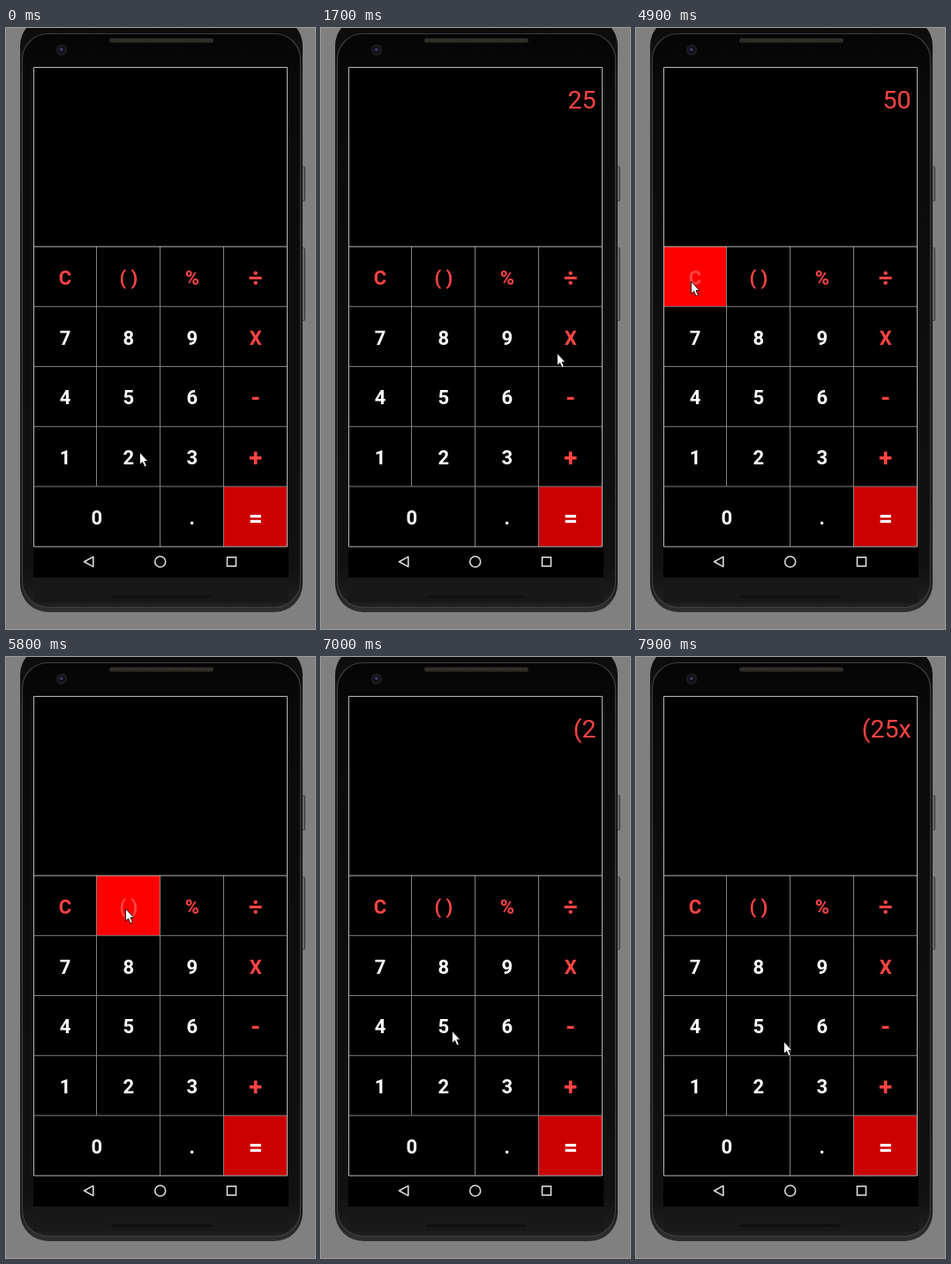
Write an HTML page that moves like this. It is 350 px wide and 679 px high and loops after 8000 ms.

```html
<!DOCTYPE html>
<html lang="en">
<head>
<meta charset="utf-8">
<title>Calculator</title>
<style>
html, body { margin: 0; width: 100%; height: 100%; overflow: hidden; background: #808080; }
#stage { position: relative; width: 350px; height: 679px; overflow: hidden; }
svg { position: absolute; left: 0; top: 0; }
#stage, text { font-family: Roboto, "Liberation Sans", sans-serif; }

#keys text { font-size: 22px; font-weight: 700; fill: #fff; text-anchor: middle; }
#keys .op { fill: #ff4444; }
#keys .big { font-size: 28px; }
#keys rect { fill: transparent; }
#keys .equals { fill: #c00; }

#display { position: absolute; right: 38.4px; top: 62px; width: 270px; height: 40px; overflow: hidden; }
#display p { margin: 0; height: 40px; font-size: 28.5px; line-height: 40px; text-align: right; color: #ff4444; }

#lines, .key2, .key5, .keyC, .keyP, .keyX { animation: 8s step-end infinite; }
#lines { animation-name: entry; }
.key2 { animation-name: press2; }
.key5 { animation-name: press5; }
.keyC { animation-name: pressC; }
.keyP { animation-name: pressP; }
.keyX { animation-name: pressX; }
#cursor { animation: pointer 8s step-end infinite; }

@keyframes entry {
  0% { transform: translateY(0); }
  8.75% { transform: translateY(-40px); }
  16.25% { transform: translateY(-80px); }
  26.25% { transform: translateY(-120px); }
  37.5% { transform: translateY(-160px); }
  46.25% { transform: translateY(-200px); }
  62.5% { transform: translateY(-240px); }
  75% { transform: translateY(-280px); }
  86.25% { transform: translateY(-320px); }
  92.5% { transform: translateY(-360px); }
  97.5%, 100% { transform: translateY(-400px); }
}
@keyframes press2 {
  0%, 6.25%, 85%, 100% { fill: transparent; }
  5%, 83.75% { fill: #f00; }
}
@keyframes press5 {
  0%, 13.75%, 91.25%, 100% { fill: transparent; }
  12.5%, 90% { fill: #f00; }
}
@keyframes pressC {
  0%, 62.5%, 100% { fill: transparent; }
  61.25% { fill: #f00; }
}
@keyframes pressP {
  0%, 73.75%, 100% { fill: transparent; }
  72.5% { fill: #f00; }
}
@keyframes pressX {
  0%, 96.25%, 100% { fill: transparent; }
  95% { fill: #f00; }
}
/* The pointer advances in 100 ms steps */
@keyframes pointer {
  0% { transform: translate(151px, 479px); }
  1.25% { transform: translate(150px, 480px); }
  5% { transform: translate(150px, 473px); }
  8.75% { transform: translate(150px, 436px); }
  11.25% { transform: translate(148px, 425px); }
  15% { transform: translate(148px, 425px); animation-timing-function: steps(5); }
  21.25% { transform: translate(267px, 367px); }
  22.5% { transform: translate(269px, 366px); }
  23.75% { transform: translate(270px, 367px); }
  25% { transform: translate(270px, 367px); animation-timing-function: steps(5); }
  31.25% { transform: translate(149px, 460px); }
  36.25% { transform: translate(149px, 460px); animation-timing-function: steps(5); }
  42.5% { transform: translate(279px, 562px); }
  52.5% { transform: translate(279px, 562px); animation-timing-function: steps(5); }
  58.75% { transform: translate(62px, 286px); }
  61.25% { transform: translate(62px, 286px); animation-timing-function: steps(4); }
  66.25% { transform: translate(135px, 284px); }
  72.5% { transform: translate(135px, 284px); animation-timing-function: steps(4); }
  77.5% { transform: translate(134.5px, 418px); animation-timing-function: steps(4); }
  82.5% { transform: translate(140px, 474px); }
  85% { transform: translate(140px, 474px); animation-timing-function: steps(2); }
  87.5% { transform: translate(148px, 422px); }
  90% { transform: translate(148px, 422px); animation-timing-function: steps(3); }
  93.75% { transform: translate(268px, 360px); }
  96.25% { transform: translate(268px, 360px); animation-timing-function: steps(2); }
  98.75%, 100% { transform: translate(167px, 434px); }
}
</style>
</head>
<body>
<div id="stage">
  <svg width="350" height="679" viewBox="0 0 350 679">
    <defs>
      <linearGradient id="rim" x2="0" y2="1">
        <stop offset="0" stop-color="#080808"/>
        <stop offset=".1" stop-color="#1a1a1a"/>
        <stop offset=".95" stop-color="#1a1a1a"/>
        <stop offset="1" stop-color="#303030"/>
      </linearGradient>
      <linearGradient id="shell" x2="0" y2="1">
        <stop offset="0" stop-color="#050505"/>
        <stop offset=".1" stop-color="#0a0a0a"/>
        <stop offset=".93" stop-color="#111"/>
        <stop offset="1" stop-color="#202020"/>
      </linearGradient>
      <pattern id="mesh" width="3" height="3" patternUnits="userSpaceOnUse">
        <rect width="3" height="3" fill="#292622"/>
        <circle cx="1.5" cy="1.5" r=".9" fill="#403b35"/>
      </pattern>
    </defs>

    <!-- phone body -->
    <g fill="#6a6a6a" stroke="#3c3c3c">
      <rect x="335.5" y="156.5" width="3" height="39" rx="1"/>
      <rect x="335.5" y="248.5" width="3" height="82" rx="1"/>
    </g>
    <rect x="16" y="-12" width="320" height="672" rx="32" fill="url(#rim)"/>
    <rect x="18.5" y="6.5" width="315" height="648" rx="29" fill="url(#shell)" stroke="#3e3e3e" stroke-width="1.2"/>
    <rect x="31" y="621" width="289" height="28" fill="#181818"/>
    <rect x="117" y="11.5" width="118" height="5" rx="2.5" fill="url(#mesh)"/>
    <rect x="118" y="640" width="115" height="5" rx="2.5" fill="#111" stroke="#252525" stroke-dasharray="1 1"/>
    <circle cx="63" cy="24.7" r="6.3" fill="#1a1a1f"/>
    <circle cx="63" cy="24.7" r="3.8" fill="#101019"/>
    <circle cx="62.7" cy="24.3" r="1.8" fill="#3c3c6c"/>

    <!-- screen -->
    <rect x="31" y="44" width="289" height="577"/>
    <g id="keys"></g>
    <path d="M31 314.75H319M31 382.5H319M31 450.25H319M31 518H319
      M102.5 247V518M174.5 247V586M246.5 247V586"
      fill="none" stroke="#808080"/>
    <path d="M31.5 44.5H318.5V586H31.5ZM31 247H319" fill="none" stroke="#b8b8b8"/>

    <!-- navigation -->
    <g fill="none" stroke="#dcdcdc" stroke-width="1.6">
      <path d="M88.5 603L98.8 597.4V608.6Z" stroke-linejoin="round"/>
      <circle cx="174.7" cy="603" r="6"/>
      <rect x="250.5" y="598" width="10" height="10"/>
    </g>
  </svg>

  <div id="display">
    <div id="lines">
      <p></p><p>2</p><p>25</p><p>25x</p><p>25x2</p><p>50</p>
      <p></p><p>(</p><p>(2</p><p>(25</p><p>(25x</p>
    </div>
  </div>

  <svg width="350" height="679" viewBox="0 0 350 679">
    <path id="cursor" d="M.5 .5V14.2L3.6 11.4 6 16.8 8.3 15.8 6 10.5H9.8Z" fill="#fff" stroke="#000" stroke-width=".8"/>
  </svg>
</div>
<script>
const rows = [
  ["C", "( )", "%", "÷"],
  ["7", "8", "9", "X"],
  ["4", "5", "6", "-"],
  ["1", "2", "3", "+"],
  ["0", "", ".", "="]
];
const pressable = { "2": "key2", "5": "key5", "C": "keyC", "( )": "keyP", "X": "keyX", "=": "equals" };
const keys = document.getElementById("keys");

function add(tag, attrs, label = "") {
  const el = document.createElementNS("http://www.w3.org/2000/svg", tag);
  for (const name in attrs) el.setAttribute(name, attrs[name]);
  el.textContent = label;
  keys.append(el);
}

rows.forEach((row, r) => row.forEach((label, c) => {
  if (!label) return;
  const x = 31 + c * 71.9, y = 247 + r * 67.75;
  const big = "÷-+=".includes(label);
  const red = label !== "=" && (r === 0 || c === 3);
  if (pressable[label])
    add("rect", { x, y, width: 71.9, height: 67.75, class: pressable[label] });
  add("text", {
    x: x + (label === "0" ? 71.9 : 36),
    y: y + (big ? 44.8 : 42.8),
    class: (red ? "op " : "") + (big ? "big" : "")
  }, label);
}));
</script>
</body>
</html>
```
